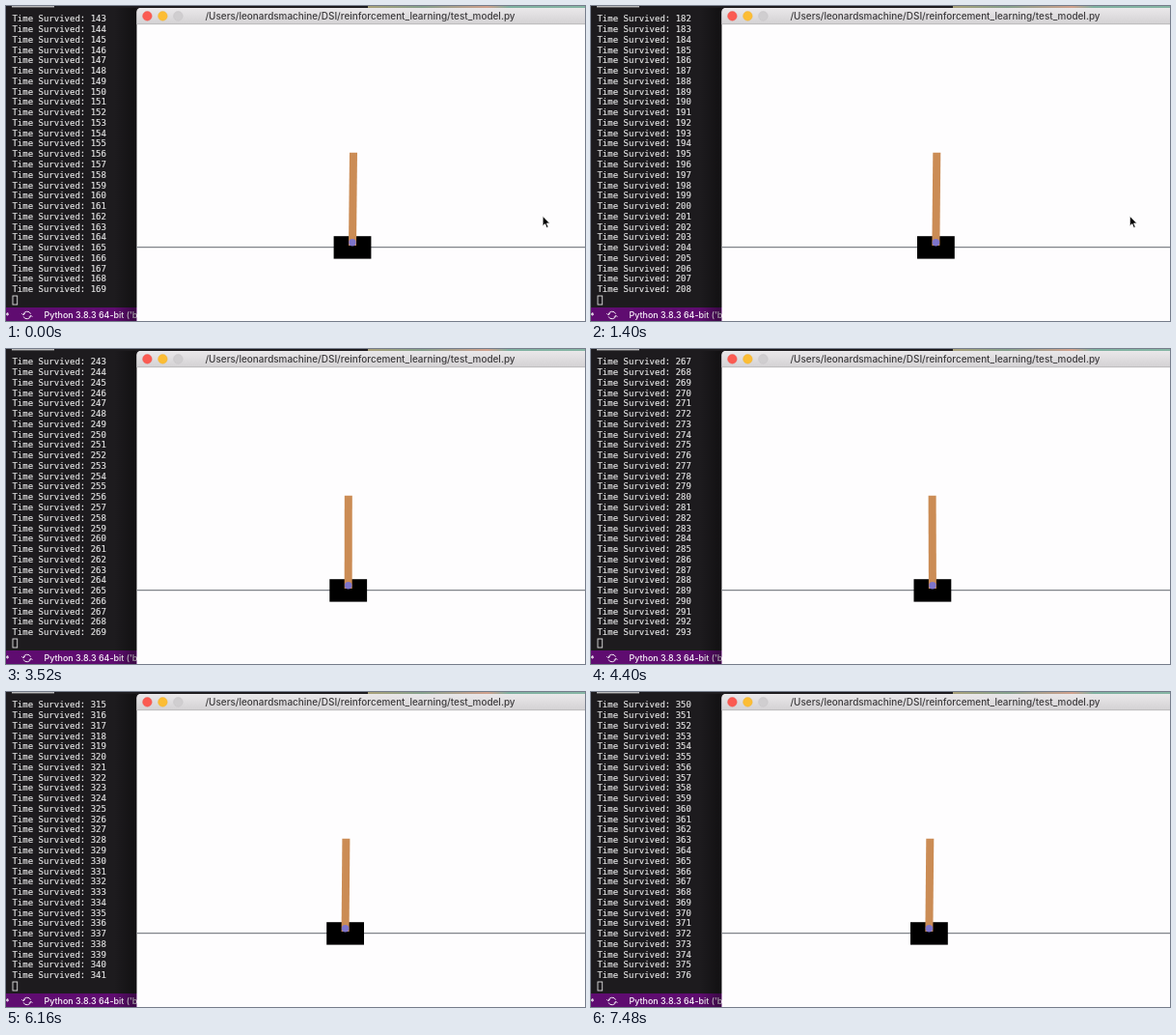
Write an HTML page that moves like this. It is 600 by 326 pixels and loops after 7520 ms.

```html
<!DOCTYPE html>
<html lang="en">
<head>
<meta charset="utf-8">
<title>Cart pole</title>
<style>
html, body { margin: 0; width: 100%; height: 100%; overflow: hidden; background: #1d1b1e; }
svg { display: block; width: 600px; height: 326px; }
text { white-space: pre; }
#log { font: 9px "DejaVu Sans Mono", monospace; fill: #e6e6e6; stroke: #e6e6e6; stroke-width: .15; }
.ui { font-family: Inter, sans-serif; font-weight: 500; }
</style>
</head>
<body>
<svg viewBox="0 0 600 326">
  <defs>
    <linearGradient id="bar" x2="0" y2="1">
      <stop stop-color="#eae8ea"/><stop offset="1" stop-color="#d3d1d3"/>
    </linearGradient>
    <linearGradient id="desk">
      <stop stop-color="#a89f78"/><stop offset=".25" stop-color="#86a08c"/>
      <stop offset=".55" stop-color="#d0a08c"/><stop offset=".65" stop-color="#7fb0a0"/>
      <stop offset="1" stop-color="#86b5a4"/>
    </linearGradient>
    <linearGradient id="shade">
      <stop stop-color="#000" stop-opacity="0"/><stop offset="1" stop-color="#000" stop-opacity=".4"/>
    </linearGradient>
  </defs>

  <!-- terminal and status bar -->
  <rect width="600" height="326" fill="#1d1b1e"/>
  <rect x="375" width="225" height="4" fill="url(#desk)"/>
  <rect x="6" y="0" width="44" height="1.4" fill="#bbb"/>
  <g id="log"></g>
  <rect x="7" y="300" width="4.7" height="9" fill="none" stroke="#ddd" stroke-width=".9"/>
  <rect y="312" width="140" height="14" fill="#5f0c70"/>
  <g class="ui" fill="#fbf5fc" font-size="8.95">
    <text x="-1" y="324">*</text>
    <text x="39.5" y="323.3">Python 3.8.3 64-bit ('base': conda)</text>
  </g>
  <g fill="none" stroke="#f3eaf5">
    <path d="M18 319.5a4 4 0 0 1 7.6-.9M25.7 320.5a4 4 0 0 1-7.6 .9"/>
    <path d="M16.3 318.2l1.7 1.7 1.7-1.7M24 321.8l1.7-1.7 1.7 1.7" stroke-width=".9"/>
  </g>
  <rect x="112" y="2" width="23" height="324" fill="url(#shade)"/>

  <!-- window -->
  <path d="M135.5 326V6.5q0-4.5 4.5-4.5H600V326z" fill="#fefdfe"/>
  <path d="M135.5 19V6.5q0-4.5 4.5-4.5H600V19z" fill="url(#bar)"/>
  <path d="M135.5 18.7H600" stroke="#b6b4b6" stroke-width=".8"/>
  <g stroke-width=".4">
    <circle cx="146.4" cy="10.4" r="4.8" fill="#fb5b52" stroke="#e9524a"/>
    <circle cx="162.4" cy="10.4" r="4.8" fill="#fcbd34" stroke="#eaae30"/>
    <circle cx="178.4" cy="10.4" r="4.8" fill="#d0ced0" stroke="#c0bec0"/>
  </g>
  <text class="ui" x="367" y="14.1" font-size="9.95" text-anchor="middle" fill="#3d3b3d">/Users/leonardsmachine/DSI/reinforcement_learning/test_model.py</text>

  <!-- scene -->
  <path d="M135.5 249.6H600" stroke="#80848a" stroke-width="1.1"/>
  <g id="cart">
    <rect x="-19.4" y="238.2" width="38.8" height="23.4"/>
    <path id="pole" fill="#cb8c55"/>
    <circle cy="244.7" r="3.7" fill="#7d74cb"/>
  </g>
  <path id="pointer" d="M0 0V10.2L2.4 8 4.1 12 5.8 11.3 4.1 7.4H7.3z" stroke="#fff" stroke-width=".7"/>
</svg>
<script>
const LOOP = 7520, STEP = 40, LINES = 27;
const times = [0, 1400, 2640, 4400, 5560, 6160, 7480];
const counts = [169, 208, 245, 293, 324, 341, 376];
const carts = [359, 357.4, 355.5, 353.9, 352.4, 351.6, 350.4];
const leans = [1, .9, .5, -.3, .2, .8, .9];
const $ = id => document.getElementById(id);

const rows = Array.from({ length: LINES }, (_, i) => {
  const row = document.createElementNS("http://www.w3.org/2000/svg", "text");
  row.setAttribute("x", 6.4);
  row.setAttribute("y", 16.2 + i * 10.77);
  return $("log").appendChild(row);
});

// Linear interpolation between the shared key times
function at(values, t) {
  let i = 1;
  while (i < times.length - 1 && t > times[i]) i++;
  const k = Math.min(1, (t - times[i - 1]) / (times[i] - times[i - 1]));
  return values[i - 1] + (values[i] - values[i - 1]) * k;
}

function draw(t) {
  const last = Math.floor(at(counts, t) + 1e-6);
  rows.forEach((row, i) => row.textContent = "Time Survived: " + (last - LINES + 1 + i));

  const lean = at(leans, t);
  $("cart").setAttribute("transform", `translate(${at(carts, t)})`);
  $("pole").setAttribute("d", `M-4 248L${lean - 4} 151.7H${lean + 4}L4 248z`);

  $("pointer").setAttribute("transform", `translate(${556.2 + 2.2 * Math.min(1, t / 1400)} 217.5)`);
  $("pointer").style.display = t < 2000 ? "" : "none";
}

const start = performance.now();
function tick() {
  const t = (performance.now() - start) % LOOP;
  draw(Math.floor(t / STEP) * STEP);
  requestAnimationFrame(tick);
}
tick();
</script>
</body>
</html>
```
